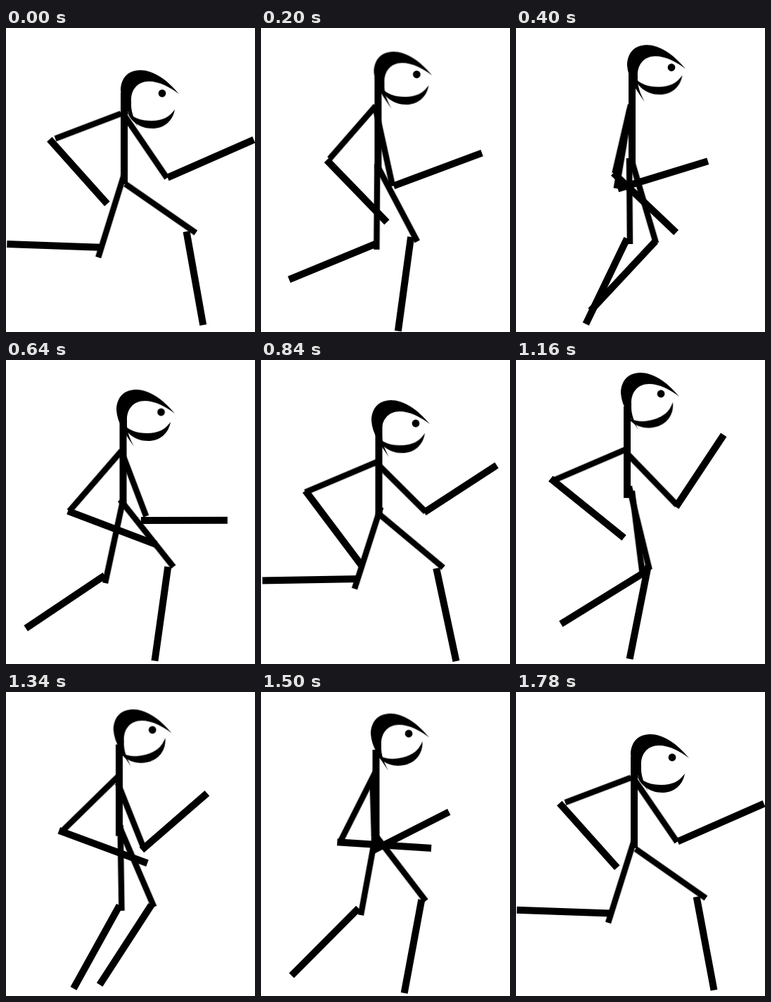
Animation of 354x432 px, one loop 1.8 s. Source, as an HTML page without scripts:

```html
<!DOCTYPE html>
<html lang="en">
<head>
<meta charset="utf-8">
<title>Runner</title>
<style>
html, body { margin: 0; width: 100%; height: 100%; overflow: hidden; background: #fff; }
svg { display: block; width: 354px; height: 432px; }
line { stroke: #000; stroke-width: 10; }
.upper { stroke-width: 8.5; }
.move { transform-origin: 0 0; animation: 1.8s linear infinite; }

#hair { animation-name: hair; }
#mouth { animation-name: mouth; }
#eye { animation-name: eye; }
#torso { animation-name: torso; }
#thighA { animation-name: thighA; }
#shinA { animation-name: shinA; }
#thighB { animation-name: thighB; }
#shinB { animation-name: shinB; }
#armA { animation-name: armA; }
#foreA { animation-name: foreA; }
#armB { animation-name: armB; }
#foreB { animation-name: foreB; }

@keyframes hair {
  0% { transform: translate(163px, 60px); }
  17.78% { transform: translate(159px, 18px); }
  22.22% { transform: translate(158px, 24px); }
  35.56% { transform: translate(157px, 42px); }
  46.67% { transform: translate(157px, 57px); }
  48.89% { transform: translate(157px, 60px); }
  64.44% { transform: translate(149px, 18px); }
  83.33% { transform: translate(156px, 30.5px); }
  98.89%, 100% { transform: translate(163px, 60px); }
}
@keyframes mouth {
  0% { transform: translate(240px, 116px) rotate(0deg); }
  17.78% { transform: translate(237.5px, 61px) rotate(-1deg); }
  22.22% { transform: translate(236.5px, 67px) rotate(-1deg); }
  35.56% { transform: translate(234px, 88px) rotate(0deg); }
  46.67% { transform: translate(233px, 104px) rotate(-2deg); }
  48.89% { transform: translate(232.5px, 107px) rotate(-2deg); }
  64.44% { transform: translate(223px, 60px) rotate(-16deg); }
  83.33% { transform: translate(229.5px, 70px) rotate(-13deg); }
  98.89%, 100% { transform: translate(240px, 116px) rotate(0deg); }
}
@keyframes eye {
  0% { transform: translate(222px, 93px); }
  17.78% { transform: translate(221px, 50px); }
  22.22% { transform: translate(221px, 56px); }
  35.56% { transform: translate(220.5px, 74px); }
  46.67% { transform: translate(220px, 90px); }
  48.89% { transform: translate(220px, 93px); }
  64.44% { transform: translate(206px, 48px); }
  83.33% { transform: translate(210px, 59px); }
  98.89%, 100% { transform: translate(222px, 93px); }
}
@keyframes torso {
  0% { transform: translate(168px, 222px); }
  17.78% { transform: translate(165.5px, 187px); }
  22.22% { transform: translate(165px, 193px); }
  35.56% { transform: translate(166.5px, 207px); }
  46.67% { transform: translate(167.5px, 220px); }
  48.89% { transform: translate(167.5px, 222px); }
  64.44% { transform: translate(158px, 196px); }
  83.33% { transform: translate(163.5px, 212px); }
  98.89%, 100% { transform: translate(168px, 222px); }
}

@keyframes thighA {
  0% { transform: translate(169.6px, 221.7px) rotate(34.6deg); }
  17.78% { transform: translate(162.7px, 180px) rotate(78.5deg); }
  22.22% { transform: translate(161px, 185px) rotate(89.5deg); }
  35.56% { transform: translate(166.6px, 197.7px) rotate(102.1deg); }
  46.67% { transform: translate(170.3px, 208.9px) rotate(107.8deg); }
  48.89% { transform: translate(170.7px, 211.6px) rotate(109deg); }
  64.44% { transform: translate(164.9px, 186px) rotate(82.9deg); }
  83.33% { transform: translate(160px, 200px) rotate(52.6deg); }
  98.89%, 100% { transform: translate(170px, 223px) rotate(35deg); }
}
@keyframes shinA {
  0% { transform: translate(110px, 6px) rotate(45.2deg); }
  22.22% { transform: translate(114px, 4px) rotate(26.1deg); }
  35.56% { transform: translate(111.5px, 3px) rotate(43.9deg); }
  46.67% { transform: translate(107.5px, .5px) rotate(71.1deg); }
  48.89% { transform: translate(107px, .5px) rotate(73deg); }
  64.44% { transform: translate(119px, 1px) rotate(65.6deg); }
  83.33% { transform: translate(117px, 3.6px) rotate(48deg); }
  98.89%, 100% { transform: translate(110px, 6px) rotate(44.4deg); }
}
@keyframes thighB {
  0% { transform: translate(167.5px, 209.6px) rotate(107.4deg); }
  17.78% { transform: translate(164px, 183px) rotate(80.4deg); }
  22.22% { transform: translate(164.7px, 188.9px) rotate(73.7deg); }
  35.56% { transform: translate(162.2px, 198.4px) rotate(51.6deg); }
  46.67% { transform: translate(165.4px, 216.8px) rotate(39.9deg); }
  48.89% { transform: translate(166.9px, 220.9px) rotate(38deg); }
  64.44% { transform: translate(160.8px, 179.5px) rotate(76.2deg); }
  83.33% { transform: translate(164px, 197px) rotate(100.4deg); }
  98.89%, 100% { transform: translate(167.7px, 211.6px) rotate(107.5deg); }
}
@keyframes shinB {
  0% { transform: translate(107px, -.6px) rotate(74.8deg); }
  22.22% { transform: translate(119px, 0) rotate(59.5deg); }
  35.56% { transform: translate(117px, 6px) rotate(46.5deg); }
  46.67% { transform: translate(115px, 7px) rotate(38.1deg); }
  48.89% { transform: translate(115px, 7px) rotate(37deg); }
  64.44% { transform: translate(116px, .5px) rotate(24.9deg); }
  83.33% { transform: translate(113px, 5px) rotate(34.3deg); }
  98.89%, 100% { transform: translate(107.6px, -.8px) rotate(74.5deg); }
}

@keyframes armA {
  0% { transform: translate(163.5px, 121.7px) rotate(159.3deg); }
  17.78% { transform: translate(163px, 104px) rotate(114.4deg); }
  22.22% { transform: translate(163px, 109px) rotate(103.2deg); }
  35.56% { transform: translate(163.7px, 128.5px) rotate(69.3deg); }
  46.67% { transform: translate(163.3px, 145.3px) rotate(45deg); }
  48.89% { transform: translate(163px, 148px) rotate(41deg); }
  64.44% { transform: translate(159.3px, 134.3px) rotate(45.8deg); }
  83.33% { transform: translate(158.5px, 125px) rotate(88deg); }
  98.89%, 100% { transform: translate(163.5px, 121.7px) rotate(159.3deg); }
}
@keyframes foreA {
  0% { transform: translate(108px, 2px) rotate(-111.1deg); }
  22.22% { transform: translate(100px, 2px) rotate(-59.5deg); }
  35.56% { transform: translate(103px, 9px) rotate(-69.3deg); }
  46.67% { transform: translate(99px, 2px) rotate(-78deg); }
  48.89% { transform: translate(99px, 2px) rotate(-77deg); }
  64.44% { transform: translate(101px, 3px) rotate(-102.4deg); }
  83.33% { transform: translate(101px, 4px) rotate(-115.2deg); }
  98.89%, 100% { transform: translate(108px, 2px) rotate(-111.1deg); }
}
@keyframes armB {
  0% { transform: translate(164.6px, 119px) rotate(55.6deg); }
  17.78% { transform: translate(161.5px, 110px) rotate(90.7deg); }
  22.22% { transform: translate(161.8px, 115.6px) rotate(99.5deg); }
  35.56% { transform: translate(164.5px, 128.7px) rotate(130.8deg); }
  46.67% { transform: translate(168px, 143.5px) rotate(157deg); }
  48.89% { transform: translate(168px, 146px) rotate(161deg); }
  64.44% { transform: translate(157.9px, 126.3px) rotate(156.9deg); }
  83.33% { transform: translate(163.8px, 111.4px) rotate(117deg); }
  98.89%, 100% { transform: translate(164.6px, 119px) rotate(55.6deg); }
}
@keyframes foreB {
  0% { transform: translate(114px, -1px) rotate(-79.3deg); }
  22.22% { transform: translate(114px, -2px) rotate(-116.7deg); }
  35.56% { transform: translate(115px, 1.5px) rotate(-110.2deg); }
  46.67% { transform: translate(113px, 2px) rotate(-104deg); }
  48.89% { transform: translate(113px, 2px) rotate(-104deg); }
  64.44% { transform: translate(116.5px, 4px) rotate(-117.9deg); }
  83.33% { transform: translate(116px, 3.6px) rotate(-113.2deg); }
  98.89%, 100% { transform: translate(114px, -1px) rotate(-79.3deg); }
}
</style>
</head>
<body>
<svg viewBox="0 0 354 432" width="354" height="432">
  <line id="torso" class="move" x1="0" y1="-130" x2="0" y2="0"/>

  <g id="thighA" class="move">
    <line class="upper" x1="0" y1="0" x2="122" y2="0"/>
    <line id="shinA" class="move" x1="0" y1="0" x2="135" y2="0"/>
  </g>
  <g id="thighB" class="move">
    <line class="upper" x1="0" y1="0" x2="122" y2="0"/>
    <line id="shinB" class="move" x1="0" y1="0" x2="135" y2="0"/>
  </g>

  <g id="armA" class="move">
    <line class="upper" x1="0" y1="0" x2="100" y2="0"/>
    <line id="foreA" class="move" x1="0" y1="0" x2="123" y2="0"/>
  </g>
  <g id="armB" class="move">
    <line class="upper" x1="0" y1="0" x2="114" y2="0"/>
    <line id="foreB" class="move" x1="0" y1="0" x2="134" y2="0"/>
  </g>

  <path id="hair" class="move" d="M83 34C65 12 45 0 28 0C8 0 0 14 0 29C1 48 14 65 25 81C19 70 14 58 15 45C14 28 24 16 40 16C55 16 70 24 83 34Z"/>
  <path id="mouth" class="move" d="M0 0C-3 17-16 27-32 27C-50 27-64 16-68 2C-60 12-48 16-33 16C-18 16-8 11 0 0Z"/>
  <circle id="eye" class="move" r="5.4"/>
</svg>
</body>
</html>
```
